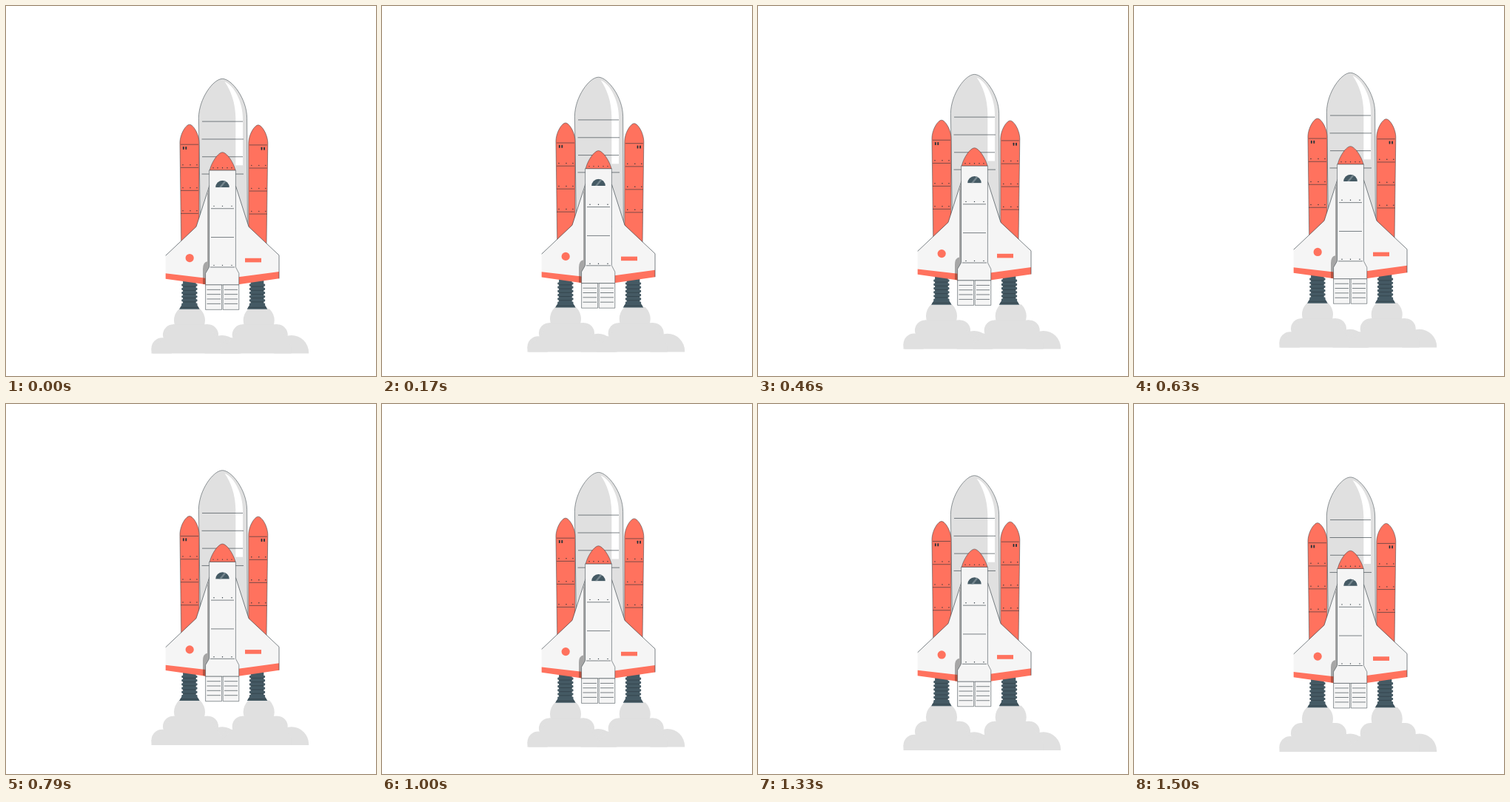
Animation of 500 by 500 pixels, one loop 1.54 s. Source, as an HTML page:

```html
<!DOCTYPE html>
<html lang="en">
<head>
<meta charset="utf-8">
<title>Shuttle</title>
<style>
html, body { margin: 0; width: 100%; height: 100%; overflow: hidden; background: #fff; }
svg { display: block; width: 100vw; height: 100vh; }
.ink { stroke: #263238; stroke-width: .5; stroke-linejoin: round; }
.line { fill: none; stroke-width: .6; }
.red { fill: #ff725e; }
.hull { fill: #f5f5f5; }
.grey { fill: #e0e0e0; }
.dark { fill: #263238; }
.steel { fill: #455a64; }
</style>
</head>
<body>
<svg viewBox="0 0 500 500">
  <defs>
    <clipPath id="ground"><rect x="190" y="408.8" width="230" height="60.4"/></clipPath>
    <clipPath id="pane"><path d="M283.2 244.8A9.3 9.3 0 0 1 301.8 244.8Z"/></clipPath>
    <g id="cloud" class="grey">
      <circle cx="248" cy="424.5" r="21"/>
      <circle cx="226" cy="444" r="14"/>
      <circle cx="273" cy="444" r="14"/>
      <circle cx="211" cy="462.5" r="14.5"/>
      <circle cx="292" cy="468" r="23.4"/>
      <path d="M226 430H273L292 460V470H196.5V462.5L212 450Z"/>
    </g>
  </defs>
  <g id="ship">
    <g clip-path="url(#ground)">
      <use href="#cloud"/>
      <use href="#cloud" x="93.7"/>
    </g>
    <g id="legs"></g>

    <path class="grey ink" d="M262.6 300L260.4 151C260.5 125 280 98 292.5 98S325.5 125 325.6 151L326.4 300Z"/>
    <path fill="#fff" d="M295.5 102C309 107 320 131 320 151V215H310.3V151C310 131 304 114 295.5 102Z"/>
    <path class="ink line" d="M265 155.7H320M264.5 179.6H321M265 203.4H320M264.5 226.7H321"/>

    <g id="boosters"></g>

    <path class="hull" d="M275 242L257 298L215.7 337V361L270 368H275Z"/>
    <path class="hull" d="M310.5 243L328 298L369 336.500V359L315 366H310Z"/>
    <path class="red" d="M215.7 361L270 367.3V376L215.7 368.4Z"/>
    <path class="red" d="M369 358.6L314 366V376L369 368Z"/>
    <path class="ink line" d="M275 242L257 298L215.7 337M310.5 243L328 298L369 336.500V368"/>
    <circle class="red" cx="248.2" cy="340.2" r="5.6"/>
    <rect class="red" x="323" y="340.4" width="22" height="5.6"/>
    <path fill="#a6a6a6" d="M275 241L272 254V345Q266 346 266 355V367L270 367.5L275 355Z"/>
    <path fill="#b5513f" d="M266 366.8L270 367.3V376L266 375.4Z"/>

    <path class="hull ink" d="M274.6 221.5H310.4V352.5L314.8 361V376.5H269.6V361L274.6 352.5Z"/>
    <path class="red ink" d="M275.3 221.5C278 210 287 197.4 292.5 197.4S307 210 310 221.5Z"/>
    <path class="ink line" d="M277 273.4H308M277 312.2H308M276 352.6H309"/>
    <g clip-path="url(#pane)">
      <rect class="steel" x="282" y="235" width="21" height="11"/>
      <path fill="#75868e" d="M287 246L296 235H299L290 246Z"/>
    </g>
    <path class="hull ink" d="M269.6 376.5H291.6V410H269.6ZM293.2 376.5H314.8V410H293.2Z"/>
    <g id="trim"></g>
  </g>
</svg>
<script>
const ship = document.getElementById('ship');
const fill = (id, html) => { document.getElementById(id).innerHTML = html; };
const rule = (x1, x2, y) => `<path class="ink line" d="M${x1} ${y}H${x2}"/>`;
const dots = (xs, y) => xs.map(x => `<circle class="dark" cx="${x}" cy="${y}" r=".7"/>`).join('');
const slab = (cx, half, y, h) =>
  `<rect class="steel" x="${cx - half}" y="${y}" width="${2 * half}" height="${h}" rx="1"/>`;

function leg(cx) {
  let s = slab(cx, 8.8, 370, 38);
  for (let i = 0; i < 6; i++) {
    const y = 375.2 + i * 5.2;
    s += slab(cx, 10.6, y, 3.2) +
      `<path stroke="#263238" stroke-width=".5" d="M${cx - 9} ${y + 3.5}h18"/>`;
  }
  return s + `<path class="steel" d="M${cx - 10} 403H${cx + 10}L${cx + 13.8} 409.4H${cx - 13.8}Z"/>` +
    `<path stroke="#263238" stroke-width=".5" d="M${cx - 12.5} 407h25"/>`;
}

// side: -1 left, 1 right
function booster(cx, top, side) {
  const inner = cx - side * 13, outer = cx + side * 13;
  let s = `<path class="red ink" d="M${inner} 322V${top + 25}C${inner} ${top + 13} ${cx - side * 5} ${top} ${cx} ${top}` +
    `S${outer} ${top + 13} ${outer} ${top + 25}L${outer - side * 1.8} 322Z"/>`;
  s += rule(cx - 12, cx + 12, top + 27);
  for (let i = 0; i < 3; i++) {
    const y = top + 58.2 + i * 31;
    s += rule(cx - 12, cx + 12, y) + dots([cx - 9, cx + 1, cx + 10], y - 3.7);
  }
  for (const d of [4.7, 8.2])
    s += `<rect class="dark" x="${cx + side * d - 0.9}" y="${top + 29.8}" width="1.8" height="4" rx=".6"/>`;
  return s;
}

fill('legs', leg(247.9) + leg(339.5));
fill('boosters', booster(248, 159.8, -1) + booster(340.8, 160.5, 1));
fill('trim',
  dots([280, 286, 292.5, 299, 305], 218.4) +
  dots([281, 292.5, 305], 270) +
  dots([281, 292.5, 305], 350) +
  [383, 389.3, 395.6, 402].map(y => rule(271.5, 290, y) + rule(295, 313, y)).join(''));

const LOOP = 1540, STEPS = 37, RISE = 10, LOW = 0.9;
const start = k => Math.round(k * 100 / 24) * 10;

function draw(now) {
  const t = now % LOOP;
  let k = STEPS - 1;
  while (k > 0 && start(k) > t) k--;
  const p = (k + 1) % STEPS / STEPS;
  const y = LOW - RISE * (1 - Math.abs(2 * p - 1));
  ship.setAttribute('transform', `translate(0 ${y.toFixed(3)})`);
}

let origin;
function tick(now) {
  origin ??= now;
  draw(now - origin);
  requestAnimationFrame(tick);
}
draw(0);
requestAnimationFrame(tick);
</script>
</body>
</html>
```
